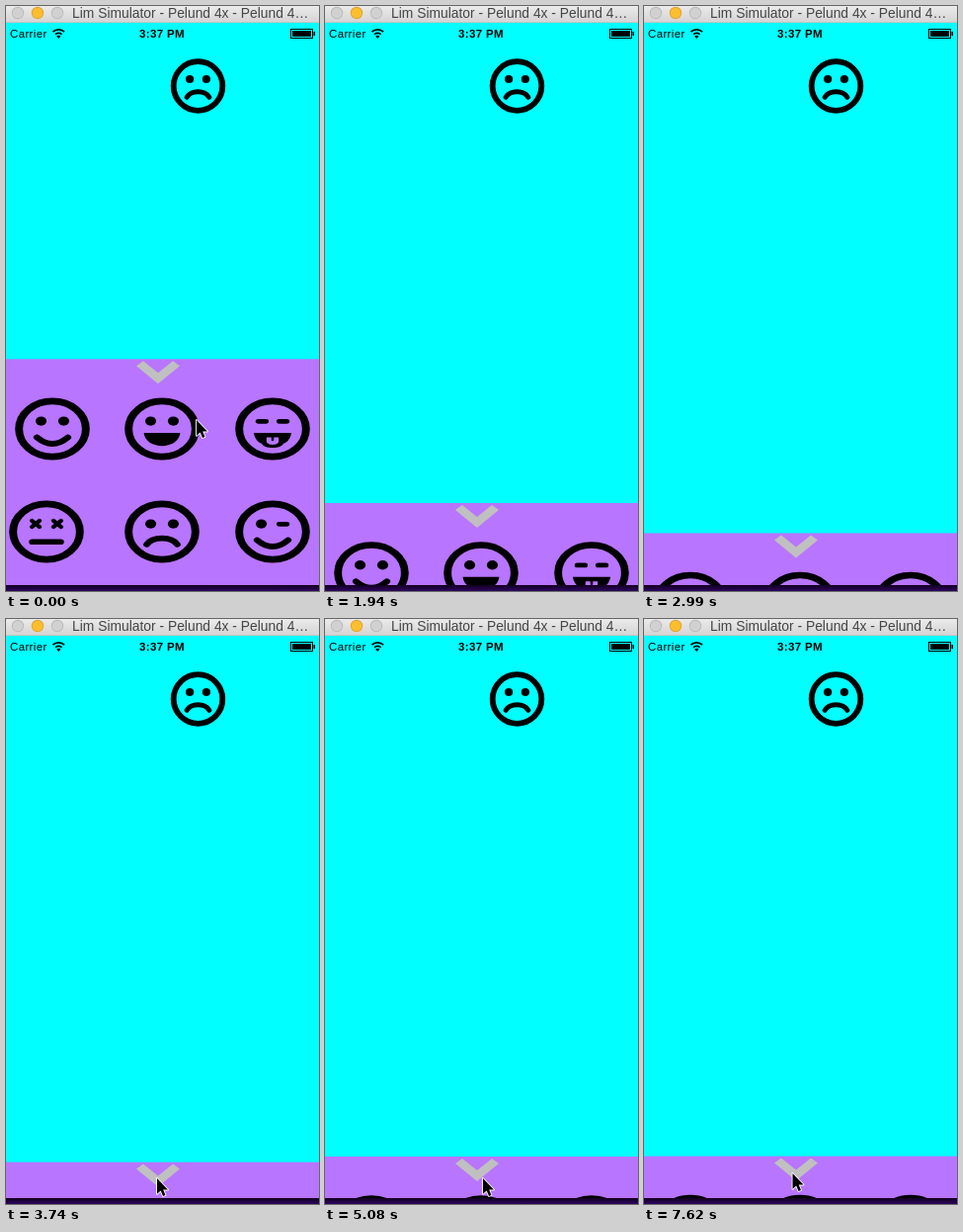
These frames come from a looping animation (317 px wide and 592 px high, 8000 ms). An HTML page with a canvas:

```html
<!DOCTYPE html>
<html lang="en">
<head>
<meta charset="utf-8">
<title>Emoticon tray</title>
<style>
html, body { margin: 0; width: 100%; height: 100%; overflow: hidden; background: #0ff; }
canvas { display: block; width: 317px; height: 592px; }
</style>
</head>
<body>
<canvas id="stage" width="317" height="592"></canvas>
<script>
const ctx = document.getElementById('stage').getContext('2d');
const W = 317, H = 592, FLOOR = 586, LOOP = 8000, STEP = 150;
const CYAN = '#00ffff', PURPLE = '#b875ff';
const SANS = '"Liberation Sans", Arial, sans-serif';

// Spans of time in which the picture advances in steps
const bursts = [[900, 1200], [1650, 2690], [2840, 3740], [4190, 5230],
  [5380, 5830], [6130, 7030], [7180, 7620]];

// time, top of tray
const trayKeys = [[0, 357.3], [1500, 357.3], [1650, 372], [1800, 447], [1940, 503],
  [2540, 521], [2690, 527], [3740, 549.6], [4040, 549.6], [5080, 544],
  [5230, 543.4], [5830, 542.6], [6130, 542.6], [7030, 543.2], [7620, 543.6]];

// time, tip of pointer
const pointerKeys = [[0, 193, 419], [750, 193, 419], [1200, 155, 372], [3739, 155, 372],
  [3740, 153, 566], [4040, 153, 566], [5080, 160, 566], [5230, 160, 566],
  [5830, 196, 565], [6130, 196, 565], [7030, 152, 566], [7620, 150.5, 561]];

function snap(t) {
  let last = 0;
  for (const [start, end] of bursts) {
    if (t < start) break;
    if (t < end) return Math.max(start, end - STEP * Math.ceil((end - t) / STEP));
    last = end;
  }
  return last;
}

function sample(keys, t) {
  const i = keys.findIndex(k => k[0] > t);
  if (i < 0) return keys[keys.length - 1].slice(1);
  const a = keys[i - 1], b = keys[i], p = (t - a[0]) / (b[0] - a[0]);
  return a.slice(1).map((v, j) => v + (b[j + 1] - v) * p);
}

function rect(x, y, w, h, color) {
  ctx.fillStyle = color;
  ctx.fillRect(x, y, w, h);
}

function disc(x, y, r, color) {
  ctx.fillStyle = color;
  ctx.beginPath();
  ctx.arc(x, y, r, 0, 7);
  ctx.fill();
}

function fill(d, color = '#000') {
  ctx.fillStyle = color;
  ctx.fill(new Path2D(d));
}

function stroke(d, width, color = '#000') {
  ctx.lineWidth = width;
  ctx.strokeStyle = color;
  ctx.stroke(new Path2D(d));
}

function text(str, x, y, font, color, spacing = 0) {
  ctx.font = font + ' ' + SANS;
  ctx.letterSpacing = spacing + 'px';
  ctx.fillStyle = color;
  ctx.fillText(str, x, y);
}

const dot = side => disc(8.4 * side, -7, 4.1, '#000');
const dash = side => stroke(`M${5 * side} -6.8H${10.5 * side}`, 4.2);
const cross = x => stroke(`M${x - 2.8} -9.8l5.6 5.6m0 -5.6l-5.6 5.6`, 3.4);
const smile = () => stroke('M-11.5 7.5Q0 19 11.5 7.5', 5);

const moods = {
  happy() { dot(-1); dot(1); smile(); },
  grin() { dot(-1); dot(1); fill('M-13.5 3.5H13.5C12 19 -12 19 -13.5 3.5Z'); },
  tongue() {
    dash(-1); dash(1);
    fill('M-14 3.5H14C13 9 11 12 8 13C7 18 -7 18 -8 13C-11 12 -13 9 -14 3.5Z');
    fill('M-4.5 7.5H4.5V11C4.5 15 -4.5 15 -4.5 11Z', PURPLE);
    stroke('M0 7V10', 1.8);
  },
  dizzy() { cross(-8); cross(8); stroke('M-10.5 9H10.5', 5); },
  sad() { dot(-1); dot(1); stroke('M-11.3 11.3C-7 4 7 4 11.3 11.3', 5); },
  wink() { dot(-1); dash(1); smile(); }
};

function face(mood, x, y, sx = 1, sy = 1) {
  ctx.save();
  ctx.translate(x, y);
  ctx.scale(sx, sy);
  ctx.lineCap = 'round';
  ctx.lineWidth = 5.8;
  ctx.strokeStyle = '#000';
  ctx.beginPath();
  ctx.arc(0, 0, 24.8, 0, 7);
  ctx.stroke();
  moods[mood]();
  ctx.restore();
}

function titleBar() {
  const g = ctx.createLinearGradient(0, 0, 0, 17);
  g.addColorStop(0, '#ebebeb');
  g.addColorStop(1, '#d3d3d3');
  rect(0, 0, W, 17, g);
  rect(0, 16.5, W, 0.5, '#b4b4b4');
  [['#b9b9b9', '#d1d1d1'], ['#dea236', '#fdbe2e'], ['#b9b9b9', '#d1d1d1']].forEach(([rim, body], i) => {
    disc(12 + 20 * i, 7, 6.2, rim);
    disc(12 + 20 * i, 7, 5.3, body);
  });
  text('Lim Simulator - Pelund 4x - Pelund 4…', 67, 12, '13.85px', '#454545');
}

function statusBar() {
  text('Carrier', 4, 32, '11.5px', '#000', 0.35);
  text('3:37 PM', 135, 32, 'bold 11.5px', '#000', 0.35);
  for (const r of [4.6, 8.2]) {
    ctx.beginPath();
    ctx.arc(53.3, 32, r, -Math.PI * 0.75, -Math.PI * 0.25);
    ctx.lineWidth = 1.7;
    ctx.strokeStyle = '#000';
    ctx.stroke();
  }
  fill('M53.3 33L51.2 30.6Q53.3 29 55.4 30.6Z');
  ctx.lineWidth = 1;
  ctx.strokeRect(288.5, 23.5, 22, 9);
  rect(290, 25, 19, 6, '#000');
  rect(311.5, 26, 1.5, 4, '#000');
}

function tray(y) {
  ctx.save();
  ctx.beginPath();
  ctx.rect(0, 0, W, FLOOR);
  ctx.clip();
  ctx.translate(0, y);
  rect(0, 0, W, H, PURPLE);
  fill('M139 2L154 14L169 2L176 7L154 25L132 7Z', '#c0c0c0');
  const rows = [['happy', 'grin', 'tongue'], ['dizzy', 'sad', 'wink']];
  rows.forEach((row, r) => row.forEach((mood, c) => {
    const x = [r ? 41 : 47, 158, 270][c];
    face(mood, x, 70.7 + 104 * r, 1.365, 1.135);
  }));
  ctx.restore();
}

function desktop() {
  const g = ctx.createLinearGradient(0, FLOOR, 0, H);
  g.addColorStop(0, '#12001f');
  g.addColorStop(1, '#2c0560');
  rect(0, FLOOR, W, H - FLOOR, g);
}

function pointer(x, y) {
  const arrow = 'M0 0V15.8L3.7 12.4L6 18L8.5 17L6.2 11.5H11Z';
  ctx.save();
  ctx.translate(x, y);
  ctx.lineJoin = 'round';
  stroke(arrow, 1.8, '#fff');
  fill(arrow);
  ctx.restore();
}

function draw(now) {
  const t = snap(now % LOOP);
  rect(0, 0, W, H, CYAN);
  titleBar();
  statusBar();
  face('sad', 194.5, 81);
  tray(sample(trayKeys, t)[0]);
  desktop();
  // The pointer is out of view while the tray is dragged
  if (t < 1650 || t >= 3740) pointer(...sample(pointerKeys, t));
}

const begin = performance.now();
function tick() {
  draw(performance.now() - begin);
  requestAnimationFrame(tick);
}
tick();
</script>
</body>
</html>
```
